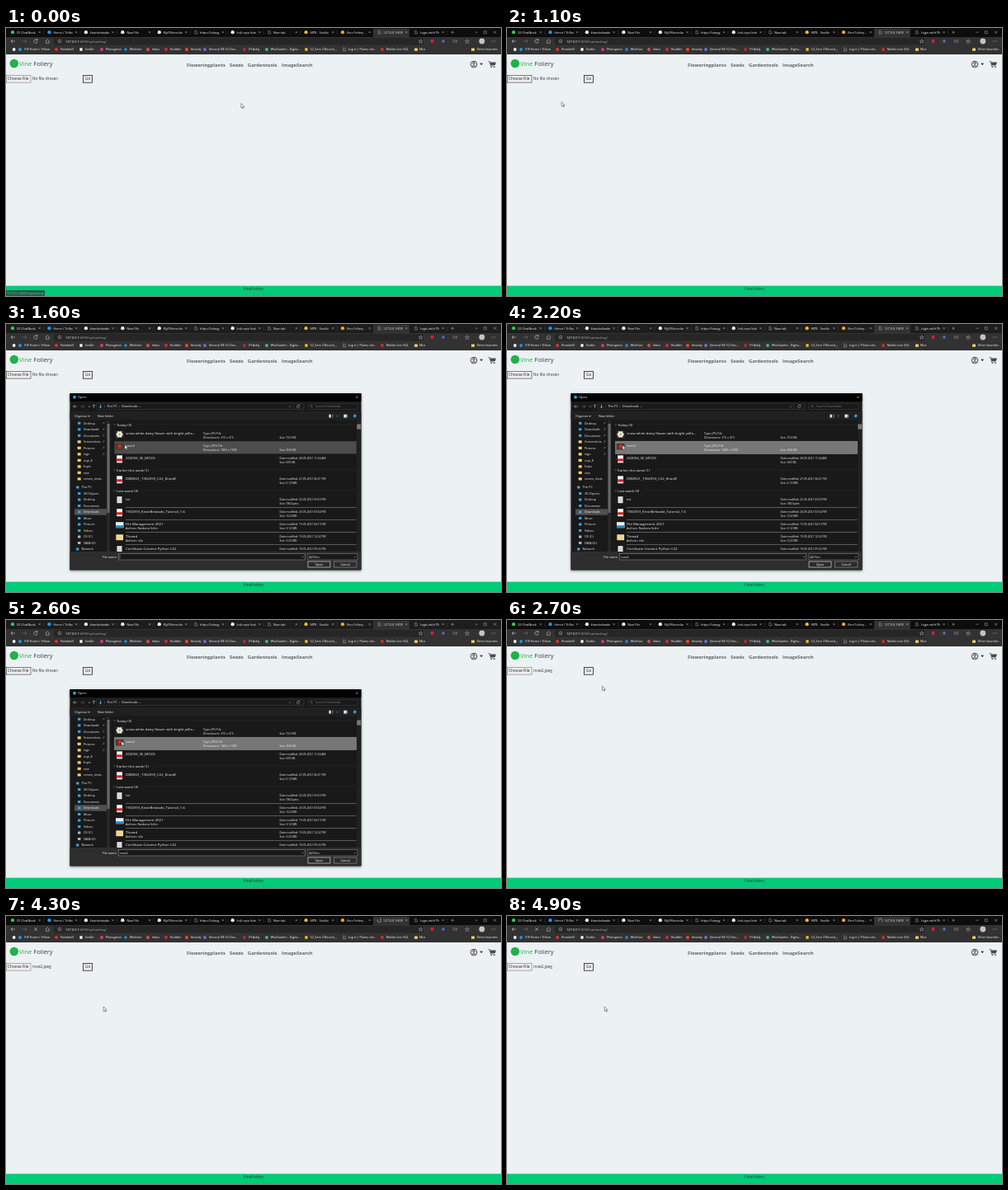
Animation of 600x325 px, one loop 5000 ms. Source, as an HTML page:

```html
<!DOCTYPE html>
<html lang="en">
<head>
<meta charset="utf-8">
<title>Image upload</title>
<style>
html, body { margin: 0; width: 100%; height: 100%; overflow: hidden; background: #ecf1f3; }
svg { display: block; font-family: "Open Sans", "Noto Sans", sans-serif; }
#shadow { filter: drop-shadow(.5px 1px 1.5px #0008); }
</style>
</head>
<body>
<svg id="stage" width="600" height="325" viewBox="0 0 600 325"></svg>
<script>
const stage = document.getElementById('stage');

const text = (x, y, s, size = 3.7, fill = '#f2f2f2', more = '') =>
  `<text x="${x}" y="${y}" font-size="${size}" fill="${fill}" ${more}>${s}</text>`;
const rect = (x, y, w, h, fill, more = '') =>
  `<rect x="${x}" y="${y}" width="${w}" height="${h}" fill="${fill}" ${more}/>`;
const dot = (x, y, r, fill, more = '') =>
  `<circle cx="${x}" cy="${y}" r="${r}" fill="${fill}" ${more}/>`;
const line = (d, stroke = '#ddd', w = .5, more = '') =>
  `<path d="${d}" fill="none" stroke="${stroke}" stroke-width="${w}" ${more}/>`;
const cross = (x, y, r, c = '#ddd', w = .45) =>
  line(`M${x - r} ${y - r}l${2 * r} ${2 * r}m0 ${-2 * r}l${-2 * r} ${2 * r}`, c, w);
const folder = (x, y, c = '#f5cf62') => rect(x - 2, y - 1.5, 4, 3.2, c, 'rx=".4"');
const sheet = (x, y) => line(`M${x - 1.3} ${y - 1.8}h1.8l.9 .9v2.7h-2.7z`, '#ddd', .4);
const star = x =>
  line(`M${x} 13.8l.7 1.5 1.6.2-1.2 1.1.3 1.7-1.4-.8-1.4.8.3-1.7-1.2-1.1 1.6-.2z`, '#ddd', .4);
const clip = (x, y, w, h, s) =>
  `<svg x="${x}" y="${y}" width="${w}" height="${h}" viewBox="${x} ${y} ${w} ${h}">${s}</svg>`;
const group = (id, s) => `<g id="${id}">${s}</g>`;

function tabs() {
  const list = [
    ['#35c95b', '(2) ChatNook'], ['#1d9bf0', 'Home / Trillow'], ['#fff', 'kiranbelwade'],
    ['#fff', 'New File'], ['#fff', 'MyFlStoreclass'], ['', 'https://sitepg'],
    ['#fff', 'link-repo listing'], ['', 'New tab'], ['#f2b92c', 'MPR - Seekle Files'],
    ['#f4a62a', 'Vine Foliery - S'], ['', '127.0.0.1:8000/up'], ['', 'Login with Plumo']
  ];
  let s = rect(0, 0, 600, 11, '#0d0d0d', 'id="strip"') +
    '<path d="M445 11V2.2q0-1.4 1.4-1.4h41.2q1.4 0 1.4 1.4V11z" fill="#323232"/>';
  list.forEach(([color, name], i) => {
    const x = 8 + 44.45 * i;
    const icon = color ? dot(x, 5.2, 2.1, color) : sheet(x, 5.2);
    s += (i === 10 ? group('pageIcon', icon) : icon) +
      clip(x + 4.8, 0, 23.5, 11, text(x + 4.8, 6.6, name, 3.8)) + cross(x + 32.7, 5.2, 1);
    if (i < 9 || i === 11) s += line(`M${x + 37.5} 3.2v4.6`, '#555', .35);
  });
  return s + group('spinner', line('M450.3 5.2a2.2 2.2 0 1 1 2.2 2.2', '#8bb8e8', .7)) +
    line('M539.3 5.2h3.6m-1.8-1.8v3.6M568.5 5.2h3.2M579.3 3.7h3v3h-3z', '#ddd', .4) +
    cross(592.6, 5.2, 1.5);
}

function toolbar() {
  return rect(0, 11, 600, 21, '#323232') +
    rect(58, 12, 448, 8.6, '#262626', 'rx="1.5"') +
    line('M11 16H6m2-2l-2 2 2 2', '#ddd', .55) +
    line('M20 16h5m-2-2l2 2-2 2', '#777', .55) +
    group('reload', line('M37.6 14.4a2.2 2.2 0 1 0 .6 2M38 13v1.8h-1.8', '#ddd', .55)) +
    group('stop', cross(36, 16, 1.8, '#ddd', .55)) +
    line('M48 16l2.3-2.2 2.3 2.2M48.5 15.7v2.6h3.6v-2.6', '#ddd', .5) +
    dot(65, 16, 1.9, 'none', 'stroke="#ddd" stroke-width=".4"') + line('M65 15.7v1.3m0-2.2v.4') +
    text(72, 17.5, '127.0.0.1<tspan fill="#a8a8a8">:8000/uploadimg/</tspan>', 4, '#fff') +
    star(502.7) + rect(514.8, 14, 3.4, 4, '#d5203a', 'rx=".5"') + dot(530, 16, 1.7, '#5b6ad0') +
    line('M542.3 14v4', '#4b8be0', .7) + line('M544.2 14v4', '#d6503f', .7) + line('M546.1 14v4', '#a0a0a0', .7) +
    star(559) + dot(576.8, 16, 3.4, '#cbc4be') +
    [589, 591, 593].map(x => dot(x, 16, .4, '#eee')).join('');
}

function bookmarks() {
  const list = [
    [17, '#1d9bf0', '(18) Home / Trillow'], [61, '#e5312f', 'Postalmill'], [91, '#eee', 'Seekle'],
    [116, '#d73b77', 'Photogrove'], [145, '#2483c5', 'Workties'], [172, '#dd5145', 'Inbox'],
    [194, '#d92c3a', 'Huddler'], [219, '#ff4b1f', 'thready'], [241, '#6873d8', 'General (SE C2 Clas...'],
    [289, '#b92b27', '(7) Askly'], [316, '#43b78d', 'WireGarden - Digita...'],
    [364, '#f2b92c', 'C2_Sem 3 Record_...'], [410, '', 'Log in | Plumo site...'],
    [456, '#e32a21', 'Marble Live SQL']
  ];
  const label = (x, s) => text(x, 27.4, s, 3.6, '#fff', 'font-weight="500"');
  return dot(9.7, 26, 1.9, '#eee') +
    list.map(([x, c, s]) => (c ? dot(x, 26, 1.9, c) : sheet(x, 26)) + label(x + 4.7, s)).join('') +
    folder(497, 26) + label(501, 'Misc') +
    folder(566, 26) + label(570.5, 'Other favorites');
}

function page() {
  const links = [[219, 'Floweringplants'], [271, 'Seeds'], [293, 'Gardentools'], [334, 'ImageSearch']];
  return rect(0, 32, 600, 293, '#ecf1f3') +
    dot(9.8, 43, 5.3, '#22b14c') +
    text(16, 46, '<tspan fill="#2fae50">Vine</tspan> Foliery', 7.55, '#36403b') +
    links.map(([x, s]) => text(x, 47, s, 5.85, '#5f6468', 'font-weight="700"')).join('') +
    dot(567, 44, 3.8, 'none', 'stroke="#222" stroke-width=".8"') +
    dot(567, 42.8, 1.3, 'none', 'stroke="#222" stroke-width=".8"') +
    line('M564.5 46.7q2.5-2.5 5 0', '#222', .8) +
    '<path d="M574.2 42.8h4l-2 2.3z" fill="#222"/>' +
    line('M584.6 40.5h1.7l1.2 5.6h5', '#454a4d', .8) +
    '<path d="M586.6 41.4h7.3l-1 3.7h-5.5z" fill="#454a4d"/>' +
    dot(588.2, 47.5, .8, '#454a4d') + dot(592, 47.5, .8, '#454a4d') +
    rect(.4, 57.3, 29.6, 8.8, '#efefef', 'id="choose" stroke="#777" stroke-width=".6"') +
    text(2, 63.4, 'Choose File', 4.75, '#222') +
    text(32, 63.4, '', 4.7, '#333', 'id="chosen"') +
    rect(93.5, 57.4, 11, 8.8, '#efefef', 'id="go" stroke="#222" stroke-width=".8"') +
    text(96, 63.4, 'Go', 4.75, '#222') +
    rect(0, 312.6, 600, 12.4, '#02cb78') +
    text(300, 318.3, 'VineFoliery', 4.75, '#164a35', 'text-anchor="middle"') +
    group('status', rect(0, 318, 47, 7, '#2f3a36') + text(1, 322.8, '127.0.0.1:8000/uploadimg/', 3.6, '#aab'));
}

function sidebar() {
  const quick = ['Desktop', 'Downloads', 'Documents', 'Screenshots', 'Pictures', 'mgn', 'ecpt_8', 'Ecpts', 'vine', 'screen_shots'];
  const disks = ['This PC', '3D Objects', 'Desktop', 'Documents', 'Downloads', 'Music', 'Pictures', 'Videos', 'OS (C:)', 'DATA (D:)', 'Network'];
  const blue = '#3aa2e5';
  let s = rect(83, 224.3, 39, 7.4, '#505050');
  quick.forEach((name, i) => {
    const y = 120.3 + 7.5 * i;
    s += (i < 3 ? rect(87, y - 1.5, 3.4, 3, blue) : folder(88.7, y)) + text(94, y + 1.3, name, 3.6);
    if (i < 6) s += line(`M117.2 ${y + 1}l1.7-2m-.9-.4l1.3 1.2`, '#aaa', .5);
  });
  disks.forEach((name, i) => {
    const y = 198 + 7.5 * i, inner = i && i < 10;
    s += rect(inner ? 87 : 85, y - 1.4, 3.4, 2.8, i === 8 || i === 9 ? '#aeb6bc' : blue, 'rx=".3"') +
      text(inner ? 94 : 91.5, y + 1.3, name, 3.6);
  });
  return clip(77.5, 116, 50, 160, s) +
    rect(122.3, 117, 3.6, 159, '#292929') + rect(122.5, 121, 3.2, 108, '#666');
}

function files() {
  const pdf = y => rect(134.2, y - 4, 6.8, 9, '#f4f4f4') + rect(133.8, y, 7.6, 3.2, '#d4282d');
  const daisy = y => rect(132.8, y - 4, 9.6, 9, '#33343a') +
    [0, 1, 2, 3, 4, 5].map(i => dot(137.6 + 2.5 * Math.cos(i * 1.047), y + .5 + 2.5 * Math.sin(i * 1.047), 1.6, '#eee')).join('') +
    dot(137.6, y + .5, 1.4, '#e5b92f');
  const rose = y => rect(132.8, y - 3.5, 9.8, 7.5, '#31452b') + dot(137.3, y + .3, 3, '#b11d25') + dot(138, y - .4, 1.3, '#dc4348');
  const page = y => rect(134.5, y - 4, 6, 8, '#e8e8e8') + line(`M135.7 ${y - 1.5}h3.6m-3.6 1.6h3.6m-3.6 1.6h3.6`, '#999', .4);
  const slide = y => rect(133, y - 3, 9.5, 7, '#eee') + rect(133, y + 1, 9.5, 3, '#2b8ac4');
  const dir = y => rect(133.3, y - 3, 8.8, 7, '#eed795', 'rx=".6"');
  const rows = [
    [132.3, daisy, 'snow white daisy flower with bright yello...', 'JPG File', '315 x 315', '79.3 KB'],
    [147.4, rose, 'rose2', 'JPEG File', '1465 x 1000', '30.8 KB'],
    [162.3, pdf, '202094_SE_MOCK', '', '28-05-2021 11:24 AM', '569 KB'],
    [187.3, pdf, 'DBMS21_1902093_C22_KiranB', '', '27-05-2021 06:21 PM', '6.13 MB'],
    [212.2, page, 'txt', '', '22-05-2021 03:53 PM', '784 bytes'],
    [227.2, pdf, '1902093_KiranBelwade_Tutorial_1-6', '', '20-05-2021 03:54 PM', '10.4 MB'],
    [242.2, slide, 'File Management 2021', '', '19-05-2021 04:13 PM', '3.12 MB', 'Nadeera Solim'],
    [257.2, dir, 'Thread', '', '19-05-2021 12:52 PM', '3.23 MB', 'nilo'],
    [272.2, page, 'Certificate Content Python C22', '', '18-05-2021 09:32 PM', '']
  ];
  const heads = [[122, 'Today (3)', 158], [177, 'Earlier this week (1)', 181], [202, 'Last week (9)', 165]];
  let s = rect(131.5, 142.2, 293.2, 15.2, '#4d4d4d', 'id="pick" stroke-width=".5"');
  for (const [y, name, x] of heads)
    s += line(`M130.4 ${y - .5}l1.2 1.2 1.2-1.2`, '#bbb', .4) + text(134.3, y + 1.5, name, 4.3) +
      line(`M${x} ${y}H424`, '#333', .35);
  for (const [y, icon, name, type, info, size, author] of rows) {
    s += icon(y + 1) + text(145, y + 1.4, name, 4.3) + (size && text(331.5, y + 7, 'Size: ' + size, 3.4));
    s += type
      ? text(239, y + 1.6, 'Type: ' + type, 3.5) + text(239, y + 7, 'Dimensions: ' + info, 3.5)
      : text(331.5, y + 1.4, 'Date modified: ' + info, 3.3);
    if (author) s += text(145, y + 6.8, 'Authors: ' + author, 3.5);
    if (y > 200) s += line(`M145 ${y + 10.3}H424.5`, '#999', .5);
  }
  return clip(130, 116, 300, 160, s) +
    rect(425, 117, 5.3, 159, '#202020') + rect(425.3, 121.5, 4.8, 6, '#777');
}

function dialog() {
  const box = (x, y, w, h, c = '#444') => rect(x, y, w, h, '#191919', `stroke="${c}" stroke-width=".5"`);
  const button = (x, w, s, c) => rect(x, 288, w, 7, '#2b2b2b', `stroke="${c}" stroke-width=".6"`) +
    text(x + w / 2, 292.9, s, 3.8, '#fff', 'text-anchor="middle"');
  return rect(77.5, 84, 353, 214.3, '#191919', 'id="shadow"') +
    rect(77.5, 84, 353, 9.7, '#000') + dot(83, 88.7, 2, '#2b9fd0') + text(87, 90.3, 'Open', 4) + cross(425.3, 88.7, 1.3) +
    line('M86 100h-4.4m1.8-1.8l-1.8 1.8 1.8 1.8', '#ddd') + line('M90.5 100h4.4m-1.8-1.8l1.8 1.8-1.8 1.8', '#777') +
    line('M99.8 99.5l1.2 1.2 1.2-1.2M106.5 102v-4.3m-1.7 1.7l1.7-1.7 1.7 1.7', '#ddd') +
    box(110, 96.2, 251, 7.5) + line('M114.5 97.7v4m-1.7-1.6l1.7 1.7 1.7-1.7', '#3aa2e5', 1) +
    text(119, 101.3, '› &#160;This PC &#160;› &#160;Downloads &#160;›', 3.8) +
    line('M342.7 99.5l1.3 1.2 1.3-1.2', '#bbb', .4) + line('M347.8 96.5v7', '#444', .4) +
    line('M355.7 98.8a1.8 1.8 0 1 0 .3 1.8m-.2-2.8v1.3h-1.3', '#ddd', .45) +
    box(366, 96.2, 60.5, 7.5) + dot(370, 99.5, 1.1, 'none', 'stroke="#888" stroke-width=".4"') +
    line('M370.8 100.3l1.1 1.1', '#888', .4) + text(375, 101.3, 'Search Downloads', 3.6, '#777') +
    rect(77.5, 106, 353, 10.5, '#202020') +
    text(83, 112.8, 'Organize ▾', 3.75) + text(111, 112.8, 'New folder', 3.75) +
    rect(391.5, 109.7, 2.3, 3.8, '#eee') + line('M395 110.2h1.6m-1.6 1.5h1.6m-1.6 1.5h1.6', '#ddd', .5) +
    line('M400.5 111l1.1 1 1.1-1', '#ddd', .45) +
    rect(409.4, 109.7, 4.2, 3.8, '#eee') + rect(412, 110.5, 1.2, 2.6, '#3aa2e5') +
    dot(422.7, 111.5, 2, '#2383d2') + text(421.9, 112.8, '?', 3.4, '#fff') +
    sidebar() + files() +
    rect(77.5, 276, 353, 22.3, '#2d2d2d') +
    text(117, 283.6, 'File name:', 3.7) + box(136.5, 278.7, 225.7, 7.3, '#999') +
    text(138, 283.6, '', 3.75, '#fff', 'id="fileName"') + line('M138 280v4.8', '#ddd', .4, 'id="caret"') +
    line('M358.5 281.8l1.3 1.2 1.3-1.2', '#ddd', .4) +
    box(366, 278.7, 60, 7.3, '#888') + text(367.5, 283.6, 'All Files', 3.6) + line('M421.5 281.8l1.3 1.2 1.3-1.2', '#ddd', .4) +
    button(366, 27, 'Open', '#eee') + button(397.5, 27.5, 'Cancel', '#999');
}

stage.innerHTML = page() + tabs() + toolbar() + bookmarks() + group('dialog', dialog()) +
  group('cursor',
    '<path id="arrow" d="M0 0v5.4l1.3-1.1.9 2 .9-.4-.9-1.9h1.7z" fill="#fff" stroke="#333" stroke-width=".5"/>' +
    '<path id="hand" d="M-.6 0q.6-.7 1.2 0v2.5l2.5.6q.9.3.7 1.3l-.5 2.6h-3.6l-2-2.7q.1-1 1.7.3z" fill="#fff" stroke="#222" stroke-width=".5"/>');

const el = id => document.getElementById(id);
const show = (id, on) => el(id).setAttribute('visibility', on ? 'visible' : 'hidden');
const set = (id, name, value) => el(id).setAttribute(name, value);

// time, x, y
const path = [
  [0, 285, 91.5], [500, 24, 62], [800, 24, 62], [1100, 66.2, 89.6], [1600, 144, 146.5],
  [1900, 140, 147], [2600, 140, 147], [2700, 115.5, 80], [3000, 98.5, 63.5],
  [3900, 98.5, 63.5], [4300, 118.2, 110], [5000, 118.2, 110]
];

function pointer(t) {
  const i = path.findIndex(k => k[0] > t);
  const [t0, x0, y0] = path[i - 1], [t1, x1, y1] = path[i];
  const p = (t - t0) / (t1 - t0), e = p * p * (3 - 2 * p);
  return [x0 + (x1 - x0) * e, y0 + (y1 - y0) * e];
}

function draw(now) {
  const t = Math.floor(now % 5000 / 100) * 100;
  const [x, y] = pointer(t);
  const open = t >= 1200 && t < 2700;
  const picked = t >= 2100, loading = t >= 4000;
  const onGo = x > 93 && x < 105 && y > 57 && y < 67;
  const onRow = y > 142 && y < 157;

  set('cursor', 'transform', `translate(${x} ${y})`);
  show('arrow', !onGo);
  show('hand', onGo);
  set('go', 'fill', onGo ? '#e2e2e2' : '#efefef');
  set('go', 'stroke', onGo ? '#555' : '#222');
  set('choose', 'stroke', t >= 700 && t < 2700 ? '#333' : '#777');
  el('chosen').textContent = t < 2700 ? 'No file chosen' : 'rose2.jpeg';
  set('status', 'opacity', Math.max(0, .75 - t / 400));

  set('dialog', 'display', open ? 'inline' : 'none');
  set('strip', 'fill', open ? '#1d1d1d' : '#0d0d0d');
  set('pick', 'fill', picked ? '#777' : onRow ? '#4d4d4d' : 'none');
  set('pick', 'stroke', picked ? '#999' : 'none');
  el('fileName').textContent = picked ? 'rose2' : '';
  set('caret', 'display', picked ? 'none' : 'inline');

  show('pageIcon', !loading);
  show('spinner', loading);
  show('reload', !loading);
  show('stop', loading);
  set('spinner', 'transform', `rotate(${t * .36} 452.5 5.2)`);
  requestAnimationFrame(draw);
}
requestAnimationFrame(draw);
</script>
</body>
</html>
```
